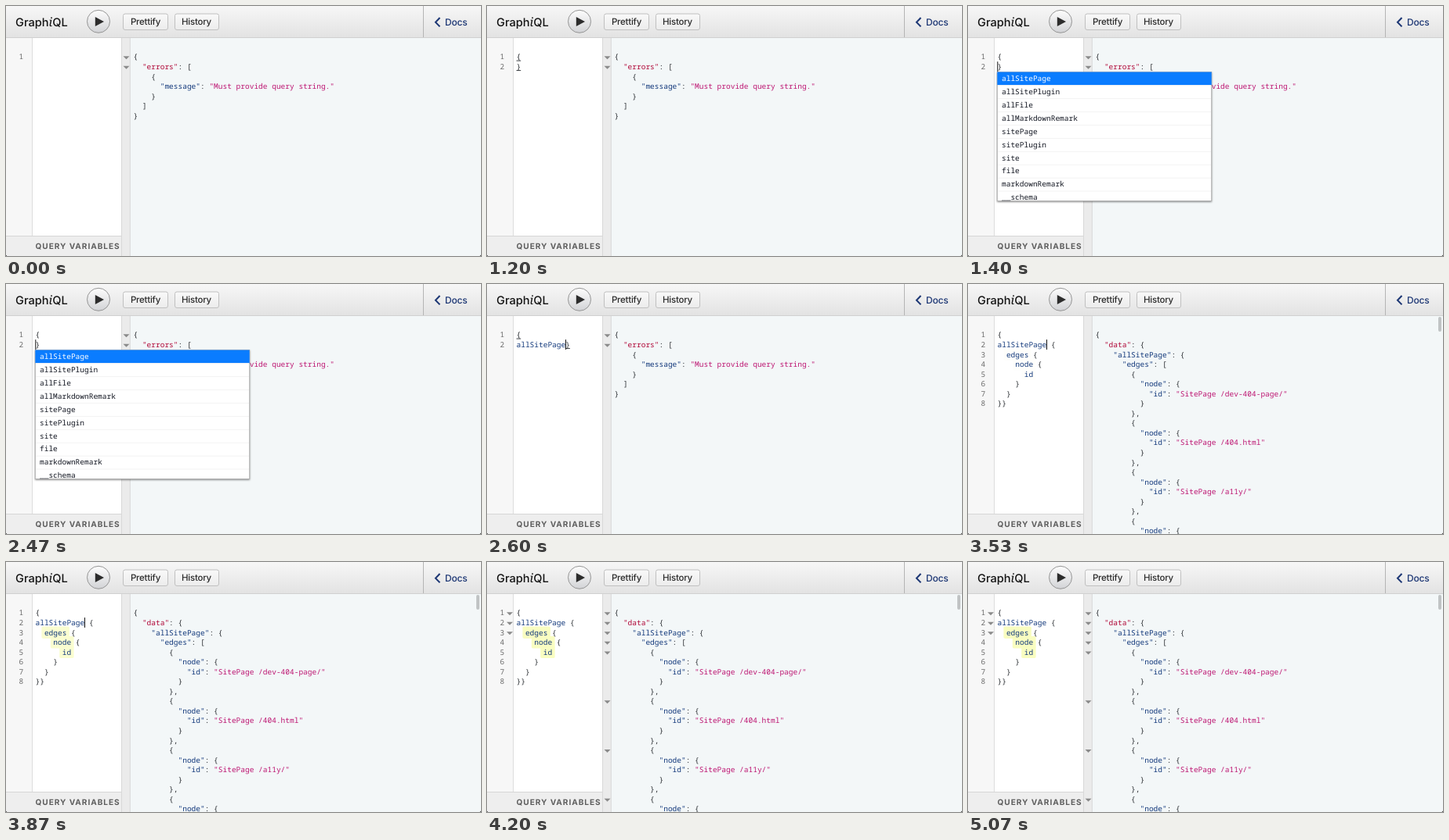
Animation, 606 px wide and 320 px high, one loop 5400 ms. Source, as an HTML page:

```html
<!DOCTYPE html>
<html lang="en">
<head>
<meta charset="utf-8">
<title>GraphiQL</title>
<style>
  html, body { margin: 0; width: 100%; height: 100%; overflow: hidden; background: #222; }
  svg { display: block; border-radius: 0 0 3px 3px; }
  text { white-space: pre; text-rendering: geometricPrecision; }
  .ui { font-family: Inter, "Open Sans", sans-serif; font-weight: 500; }
  .code { font: 500 9.5px "Noto Sans Mono", "DejaVu Sans Mono", monospace; }
</style>
</head>
<body>
<svg id="stage" width="606" height="320" viewBox="0 0 606 320">
  <defs>
    <linearGradient id="bar" x2="0" y2="1">
      <stop stop-color="#f7f7f7"/><stop offset="1" stop-color="#e2e2e2"/>
    </linearGradient>
    <linearGradient id="knob" x2="0" y2="1">
      <stop stop-color="#fdfdfd"/><stop offset="1" stop-color="#d2d3d6"/>
    </linearGradient>
    <linearGradient id="key" x2="0" y2="1">
      <stop stop-color="#f9f9f9"/><stop offset="1" stop-color="#ececec"/>
    </linearGradient>
    <clipPath id="list"><rect x="37" y="84" width="274" height="165.5"/></clipPath>
  </defs>

  <!-- panes -->
  <rect width="606" height="320" fill="#fff"/>
  <rect y="41" width="33" height="279" fill="#f7f7f7"/>
  <rect x="33" y="41" width="1" height="253" fill="#ddd"/>
  <rect x="158" y="41" width="448" height="279" fill="#f3f7f8"/>
  <rect x="147" y="41" width="11" height="279" fill="#ebebeb"/>
  <path d="M147.5 41V320M158.3 41V320" stroke="#d8d8d8"/>
  <g id="result"></g>
  <g id="editor"></g>
  <rect y="294" width="147" height="26" fill="#eee"/>
  <rect y="294" width="147" height="1" fill="#d6d6d6"/>
  <text class="ui" x="37.5" y="311" font-size="10.1" style="font-weight:700" letter-spacing=".95" fill="#5e5e5e">QUERY VARIABLES</text>

  <!-- toolbar -->
  <rect width="606" height="41" fill="url(#bar)"/>
  <rect y="40" width="606" height="1" fill="#d0d0d0"/>
  <text class="ui" x="12" y="25.5" font-size="14.6" fill="#141414">Graph<tspan font-family="'Noto Serif', 'Liberation Serif', serif" font-style="italic" font-size="15.5">i</tspan>QL</text>
  <circle cx="118" cy="19.8" r="14.5" fill="url(#knob)" stroke="#949494"/>
  <path d="M113.8 14L125 20L113.8 26Z" fill="#2c2c2c"/>
  <g class="ui" font-size="11.5" letter-spacing="-.25" text-anchor="middle" fill="#2a2a2a">
    <rect x="149.5" y="10" width="57" height="20.5" rx="2.5" fill="url(#key)" stroke="#c0c0c0"/>
    <text x="178" y="24">Prettify</text>
    <rect x="215.5" y="10" width="56" height="20.5" rx="2.5" fill="url(#key)" stroke="#c0c0c0"/>
    <text x="243" y="24">History</text>
  </g>
  <rect x="532" width="1" height="40" fill="#b4b4b4"/>
  <path d="M553.5 15L548 20.7L553.5 26.4" fill="none" stroke="#1c3674" stroke-width="2"/>
  <text class="ui" x="560" y="25" font-size="12" letter-spacing="-.2" fill="#1c3674">Docs</text>

  <g id="popup"></g>
</svg>
<script>
const LOOP = 5400, CHAR = 5.7, LINE = 12.55;
const LEFT = 37.5, RIGHT = 162.5, MID = 65;
const INK = "#2b2f33", NAVY = "#143a7c", ROOT = "#b00838", PINK = "#bd1672";
const T = { focus: 70, brace: 400, enter: 670, open: 1400, pick: 2600, run: 3470, reply: 3530, foldR: 3930, foldL: 4000 };

const mid = row => MID + row * LINE;

function add(parent, tag, attrs = {}, text = "") {
  const el = document.createElementNS("http://www.w3.org/2000/svg", tag);
  for (const k in attrs) el.setAttribute(k, attrs[k]);
  el.textContent = text;
  parent.append(el);
  return el;
}

function play(el, frames) {
  el.animate(frames, { duration: LOOP, iterations: Infinity });
}

// Shows an element only inside the given [from, to] spans.
function during(el, ...spans) {
  const frames = [];
  const step = (time, opacity) => frames.push({ opacity, offset: time / LOOP, easing: "step-end" });
  if (spans[0][0] > 0) step(0, 0);
  for (const [from, to = LOOP] of spans) {
    step(from, 1);
    if (to < LOOP) step(to, 0);
  }
  step(LOOP, frames[frames.length - 1].opacity);
  play(el, frames);
  return el;
}

// Writes one code line, coloured token by token.
function write(parent, x, row, line, colour) {
  const indent = line.search(/\S/);
  const el = add(parent, "text", { class: "code", x: x + indent * CHAR, y: mid(row) + 3.4 });
  for (const part of line.trim().match(/"[^"]*"|\w+|[^"\w]+/g))
    add(el, "tspan", { fill: colour(part, indent, line) }, part);
}

const jsonColour = (part, indent, line) =>
  part[0] !== '"' ? INK : !line.includes(part + ":") ? PINK : indent === 2 ? ROOT : NAVY;
const queryColour = part => /\w/.test(part) ? NAVY : INK;

function block(parent, x, lines, colour) {
  const g = add(parent, "g");
  lines.forEach((line, row) => write(g, x, row, line, colour));
  return g;
}

function folds(parent, x, rows) {
  const g = add(parent, "g", { fill: "#8a8a8a" });
  for (const row of rows)
    add(g, "path", { d: `M${x - 4} ${mid(row) - 0.8}h8l-4 4z` });
  return g;
}

// Result pane
const result = document.getElementById("result");
during(block(result, RIGHT, [
  '{', '  "errors": [', '    {', '      "message": "Must provide query string."', '    }', '  ]', '}'
], jsonColour), [0, T.reply]);
during(folds(result, 153.5, [0, 1]), [0, T.reply]);

const pages = ["/dev-404-page/", "/404.html", "/a11y/"];
const reply = ['{', '  "data": {', '    "allSitePage": {', '      "edges": ['];
for (const page of pages)
  reply.push('        {', '          "node": {', `            "id": "SitePage ${page}"`, '          }', '        },');
reply.push('        {', '          "node": {');
const data = during(block(result, RIGHT, reply, jsonColour), [T.reply]);
add(data, "rect", { x: 600, y: 42, width: 4, height: 19, rx: 2, fill: "#c0c3c4" });
during(folds(result, 153.5, [0, 1, 2, 3, 4, 9, 14, 19]), [T.foldR]);

// Query editor
const editor = document.getElementById("editor");
const glow = add(editor, "g", { fill: "#f9fdc0" });
[[2, 2, 5], [3, 4, 4], [4, 6, 2]].forEach(([row, col, len]) =>
  add(glow, "rect", { x: LEFT + col * CHAR - 3.5, y: mid(row) - 7.6, width: len * CHAR + 7, height: 15.4, rx: 1.8 }));
play(glow, [
  { opacity: 0, offset: 0 },
  { opacity: 0, offset: T.run / LOOP, easing: "ease" },
  { opacity: 1, offset: (T.run + 900) / LOOP },
  { opacity: 1, offset: 1 }
]);

for (let n = 1; n <= 8; n++) {
  const num = add(editor, "text", { class: "code", x: 22.3, y: mid(n - 1) + 3.4, "text-anchor": "end", fill: "#6c6c6c" }, n);
  if (n > 1) during(num, [n === 2 ? T.enter : T.run]);
}

[
  [["{}"], T.brace, T.enter],
  [["{", "}"], T.enter, T.pick],
  [["{", "allSitePage}"], T.pick, T.run],
  [["{", "allSitePage {", "  edges {", "    node {", "      id", "    }", "  }", "}}"], T.run, LOOP]
].forEach(([lines, from, to]) => during(block(editor, LEFT, lines, queryColour), [from, to]));
during(folds(editor, 29, [0, 1, 2]), [T.foldL]);

// Matching brackets: row, column, spans
[
  [0, 0, [T.brace, T.open], [T.pick, T.run]],
  [0, 1, [T.brace, T.enter]],
  [1, 0, [T.enter, T.open]],
  [1, 11, [T.pick, T.run]]
].forEach(([row, col, ...spans]) =>
  during(add(editor, "rect", { x: LEFT + col * CHAR, y: mid(row) + 4.6, width: CHAR, height: 0.9, fill: INK }), ...spans));

// Caret: row, column, spans
[
  [0, 0, [T.focus, T.brace]],
  [0, 1, [T.brace, T.enter]],
  [1, 0, [T.enter, 1200], [T.open, 1930], [2470, T.pick]],
  [1, 11, [T.pick, 3270], [T.run, T.foldL], [4530, 5070]]
].forEach(([row, col, ...spans]) =>
  during(add(editor, "rect", { x: LEFT + col * CHAR - 0.2, y: mid(row) - 6.4, width: 1, height: 12.8, fill: "#111" }), ...spans));

// Completion list
const popup = during(document.getElementById("popup"), [T.open, T.pick]);
add(popup, "rect", {
  x: 37.3, y: 84.5, width: 273.4, height: 165, fill: "#fff", stroke: "#a8a8a8", "stroke-width": 0.8,
  style: "filter:drop-shadow(0 1px 1.2px rgba(0,0,0,.45))"
});
const list = add(popup, "g", { "clip-path": "url(#list)" });
["allSitePage", "allSitePlugin", "allFile", "allMarkdownRemark", "sitePage",
 "sitePlugin", "site", "file", "markdownRemark", "__schema"].forEach((name, i) => {
  const y = 84.5 + i * 16.9;
  add(list, "rect", i ? { x: 38, y, width: 272, height: 0.8, fill: "#f0f0f0" }
                      : { x: 37.3, y, width: 273.4, height: 16.6, fill: "#0a7cff" });
  add(list, "text", { class: "code", x: 43, y: y + 11.6, fill: i ? "#141823" : "#fff" }, name);
});
</script>
</body>
</html>
```
